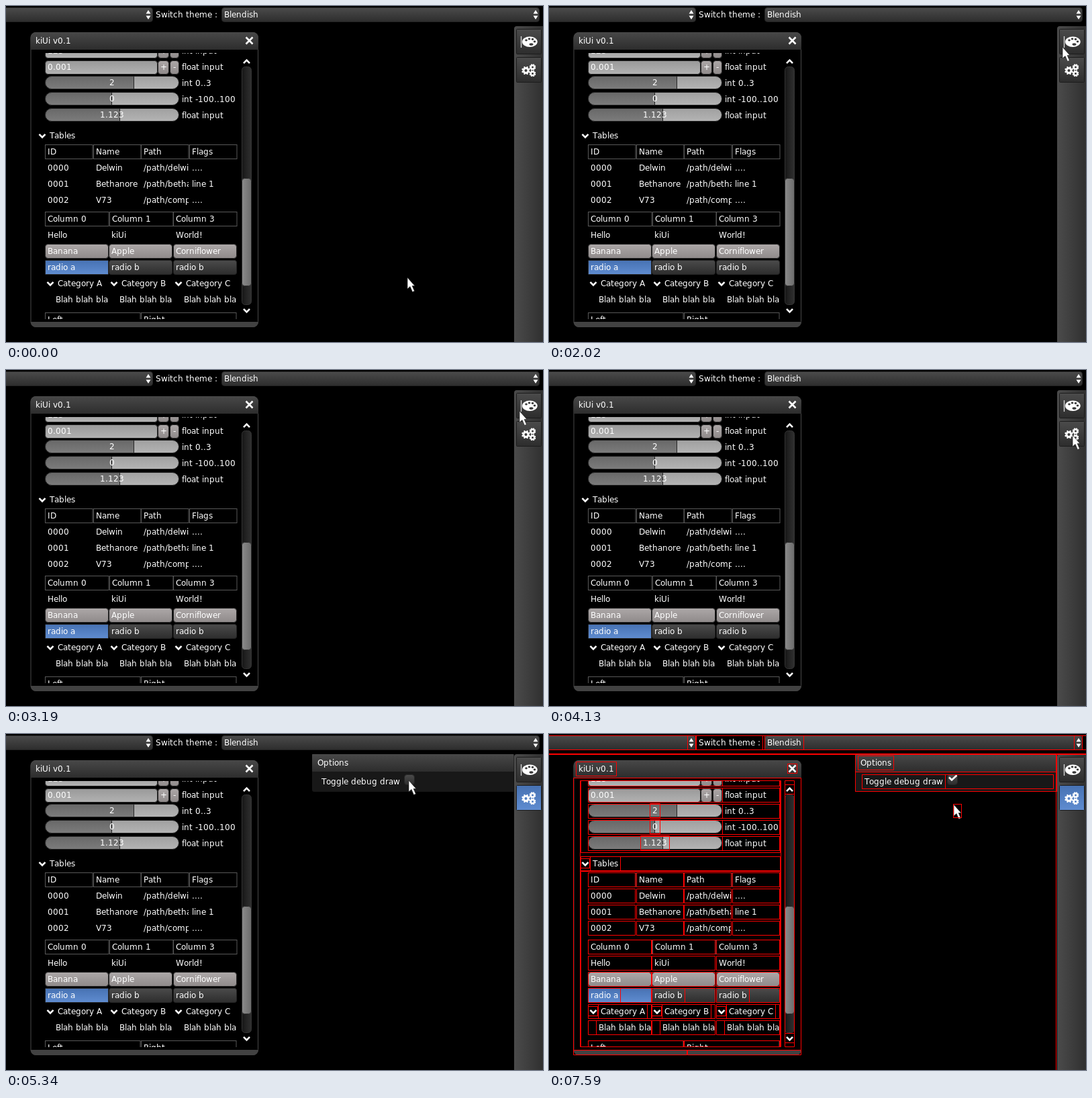
These frames come from a looping animation (800 px wide and 500 px high, 8000 ms). An HTML page:

```html
<!DOCTYPE html>
<html lang="en">
<head>
<meta charset="utf-8">
<title>Widget demo</title>
<style>
html, body { margin: 0; width: 100%; height: 100%; overflow: hidden; background: #000; }
svg { display: block; width: 800px; height: 500px; }
text { font: 12px "DejaVu Sans", sans-serif; fill: #fff; white-space: pre; }
</style>
</head>
<body>
<svg id="stage" viewBox="0 0 800 500" xmlns="http://www.w3.org/2000/svg"></svg>
<script>
const LOOP = 8000;
const stage = document.getElementById('stage');
const pen = document.createElement('canvas').getContext('2d');
pen.font = '12px "DejaVu Sans", sans-serif';
let clips = 0;

const gradient = (id, from, to, across) =>
  `<linearGradient id="${id}" x2="${across ? 1 : 0}" y2="${across ? 0 : 1}">` +
  `<stop stop-color="${from}"/><stop offset="1" stop-color="${to}"/></linearGradient>`;

const rect = (x, y, w, h, fill, r = 0, stroke = 'none') =>
  `<rect x="${x}" y="${y}" width="${w}" height="${h}" rx="${r}" fill="${fill}" stroke="${stroke}"/>`;

const path = (d, fill = '#fff', extra = '') => `<path d="${d}" fill="${fill}" ${extra}/>`;

// The interface font advances by whole pixels
const advance = c => Math.round(pen.measureText(c).width);
const textWidth = s => [...s].reduce((sum, c) => sum + advance(c), 0);

function text(x, y, s) {
  const xs = [];
  for (const c of s) {
    xs.push(x);
    x += advance(c);
  }
  return `<text x="${xs.join(' ')}" y="${y}">${s}</text>`;
}

const centred = (x, y, s) => text(Math.round(x - textWidth(s) / 2), y, s);

function clip(x, y, w, h, inner, r = 0) {
  const id = 'clip' + clips++;
  return `<clipPath id="${id}">${rect(x, y, w, h, '#fff', r)}</clipPath>` +
    `<g clip-path="url(#${id})">${inner}</g>`;
}

const box = (x, y, w, h, style, r = 4) =>
  rect(x + .5, y + .5, w - 1, h - 1, `url(#${style})`, r, '#252525');

const spinner = (x, y) =>
  path(`M${x - 3.5} ${y - 1.5}h7l-3.5 -5.5zM${x - 3.5} ${y + 1.5}h7l-3.5 5.5z`);

const chevron = (x, y, dir = 1) =>
  path(`M${x - 4.5} ${y - 2.2 * dir}l4.5 ${4.6 * dir}l4.5 ${-4.6 * dir}`, 'none',
    'stroke="#fff" stroke-width="2.6"');

// Pill-shaped slider whose dark part ends at part * w
function slider(x, y, w, part, value) {
  const edge = Math.round(x + w * part) - 1;
  let s = box(x, y, w, 20, 'light', 9.5);
  if (part >= 1) s += box(x, y, w, 20, 'filled', 9.5);
  else s += clip(x, y, edge - x, 20, box(x, y, w, 20, 'filled', 9.5)) +
    rect(edge, y + 1, 1, 18, '#252525');
  return s + centred(x + w / 2, y + 14, String(value));
}

const headers = (y, w, names) => names.map((name, i) => {
  const x = Math.round(58 + w * i);
  return rect(x + .5, y + .5, Math.round(w) - 1.5, 21, 'none', 0, '#585858') + text(x + 4, y + 15, name);
}).join('');

function topBar() {
  return box(-20, 2, 239, 22, 'dark') + spinner(212, 13) +
    text(223, 17, 'Switch theme :') +
    box(321, 2, 474, 22, 'dark') + text(325, 17, 'Blendish') + spinner(789, 13);
}

function inputs() {
  let s = '';
  [[57, '123', 'int input'], [81, '0.001', 'float input']].forEach(([y, value, label]) => {
    s += box(58, y, 168, 21, 'field') + box(226, y, 17, 21, 'button') + box(244, y, 14, 21, 'button') +
      text(62, y + 14, value) + centred(235, y + 14, '+') +
      centred(250.5, y + 14, '-') + text(262, y + 14, label);
  });
  [[2 / 3, '2', 'int 0..3'], [.5, '0', 'int -100..100'], [.56, '1.123', 'float input']]
    .forEach(([part, value, label], i) => {
      s += slider(58, 104 + 24 * i, 200, part, value) + text(262, 119 + 24 * i, label);
    });
  return s;
}

const columns = [58, 153, 249];
const radios = ['radio a', 'radio b', 'radio b'];
const categories = ['Category A', 'Category B', 'Category C'];

function tables() {
  let s = chevron(54, 193) + text(65, 197, 'Tables') +
    headers(206, 71.5, ['ID', 'Name', 'Path', 'Flags']);
  [['0000', 'Delwin', '/path/delwin', '....'],
   ['0001', 'Bethanore', '/path/bethanore', 'line 1'],
   ['0002', 'V73', '/path/computer', '....']].forEach((row, j) => {
    row.forEach((cell, i) => {
      const x = Math.round(58 + 71.5 * i);
      s += clip(x, 230 + 24 * j, 71, 24, text(x + 4, 245 + 24 * j, cell));
    });
  });
  s += headers(306, 95.5, ['Column 0', 'Column 1', 'Column 3']);
  const words = ['Hello', 'kiUi', 'World!'];
  const fruits = ['Banana', 'Apple', 'Corniflower'];
  columns.forEach((x, i) => {
    s += text(x + 4, 345, words[i]) +
      box(x, 354, 95, 22, 'button') + text(x + 4, 369, fruits[i]) +
      box(x, 378, 95, 22, i ? 'dark' : 'blue', i ? 3 : 1) + text(x + 4, 393, radios[i]) +
      chevron(x + 8, 413) + text(x + 19, 417, categories[i]) +
      clip(x, 426, 94, 24, text(x + 16, 441, 'Blah blah blah'));
  });
  return s + headers(456, 143, ['Left', 'Right']);
}

function mainWindow() {
  return rect(37, 39.5, 338.5, 438, '#000', 8, '#484848') +
    path('M36.5 65V47a8 8 0 0 1 8-8H368a8 8 0 0 1 8 8V65z', 'url(#title)') +
    path('M36.5 470H376a8 8 0 0 1-8 8H44.5a8 8 0 0 1-8-8z', '#424242') +
    text(44, 56, 'kiUi v0.1') +
    path('M357.5 46.5l10 10m0-10l-10 10', 'none', 'stroke="#fff" stroke-width="2.6"') +
    clip(46, 70, 300, 396, inputs() + tables()) +
    chevron(358.5, 83, -1) + rect(351.5, 90.5, 14, 354, 'url(#track)', 5, '#343434') +
    rect(351.5, 256.5, 14, 160, 'url(#thumb)', 4, '#2c2c2c') + chevron(358.5, 453);
}

const checkbox = (x, y) => box(x, y, 16, 16, 'dark');

const panel = (h, title) =>
  path(`M456 30H756.5V${30 + h}H459a3 3 0 0 1-3-3z`, '#181818') +
  rect(456, 30, 300.5, 26, 'url(#title)', 1) + text(464, 47, title);

function stylePanel() {
  let s = panel(392, 'Style Edit') + box(466, 60, 286, 22, 'field') +
    text(470, 75, 'Button') + spinner(745, 71) + checkbox(515, 88);
  ['Empty', 'Background Colour', 'Gradient Top', 'Gradient Bottom', 'Corner Radius', 'Border Width',
   'Border Colour', 'Text Size', 'Text Colour', 'Padding', 'Image', 'Skin Image']
    .forEach((label, i) => { s += text(470, 103 + 28 * i, label); });
  const group = (y, x, gap, w, values) => values.forEach((v, i) => {
    s += slider(x + gap * i, y, w, v, v);
  });
  group(116, 590, 40.2, 40, [.62, .6, .6, 1]);
  group(256, 557, 48.8, 47, [.146, .146, .146, 1]);
  group(312, 544, 52, 51, [1, 1, 1, 1]);
  [[144, 553, .65, 15], [172, 575, .345, -15], [200, 560, .15, 4], [228, 555, .085, 1],
   [284, 530, .275, 14], [340, 523, .155, 4]]
    .forEach(([y, x, part, value]) => { s += slider(x, y, 751.5 - x, part, value); });
  return s + box(513, 368, 239, 22, 'field') + box(544, 396, 208, 22, 'field');
}

function optionsPanel() {
  return panel(56, 'Options') + text(470, 75, 'Toggle debug draw') + checkbox(593, 60) +
    `<g id="tick">${path('M596 64.5l4 4l7.5-7', 'none', 'stroke="#fff" stroke-width="2.6"')}</g>`;
}

function gear(x, y, r) {
  let teeth = '';
  for (let i = 0; i < 8; i++) {
    const a = (i + .5) * Math.PI / 4, c = Math.cos(a), s = Math.sin(a);
    teeth += `M${x + c * r * .6} ${y + s * r * .6}L${x + c * r} ${y + s * r}`;
  }
  return path(teeth, 'none', 'stroke="#fff" stroke-width="2.2"') +
    `<circle cx="${x}" cy="${y}" r="${r * .56}" fill="none" stroke="#fff" stroke-width="${r * .48}"/>`;
}

function palette() {
  const oval = (x, y, rx, ry, fill) => `<ellipse cx="${x}" cy="${y}" rx="${rx}" ry="${ry}" fill="${fill}"/>`;
  const holes = [[775, 51], [779.5, 49], [784.5, 49.5], [787.5, 53]]
    .map(([x, y]) => oval(x, y, 1.8, 1.4, 'currentColor')).join('');
  return oval(780.3, 53.3, 11.4, 7.8, '#fff') + holes + oval(782.5, 57, 3, 1.8, 'currentColor') +
    path('M767.5 45V62', 'none', 'stroke="#ddd" stroke-width="1.3"');
}

const dockButton = (id, y, icon) =>
  `<g id="${id}">${rect(760.5, y + .5, 37, 37, 'url(#dark)', 1, '#1c1c1c')}${icon}</g>`;

function dock() {
  return path('M757 500V34a4 4 0 0 1 4-4H800V500z', 'url(#dock)') +
    dockButton('styleButton', 34, palette()) +
    dockButton('optionsButton', 76, gear(774.5, 96, 6.4) + gear(784.5, 91, 4.8) + gear(784.5, 100.5, 4.8));
}

// Layout outlines shown once debug drawing is switched on
function outlines() {
  let d = '';
  const frame = (x, y, w, h) => { d += `M${x + .5} ${y + .5}h${w - 1}v${h - 1}h${1 - w}z`; };
  const row = (xs, y, w) => xs.forEach(x => frame(x, y, w, 22));
  const label = (x, baseline, s) => frame(x - 4, baseline - 15, textWidth(s) + 8, 22);
  const icon = (x, y) => frame(x - 8, y - 8, 15, 15);
  const drawn = () => {
    const s = path(d, 'none', 'stroke="#f00"');
    d = '';
    return s;
  };

  frame(-1, 2, 802, 22);
  frame(206, 2, 13, 22);
  label(223, 17, 'Switch theme :');
  label(325, 17, 'Blendish');
  frame(782, 2, 13, 22);
  frame(-1, 29, 802, 2);
  frame(-1, 30, 757, 472);

  frame(36, 65, 340, 406);
  frame(36, 470, 170, 8);
  frame(206, 470, 170, 8);
  label(44, 56, 'kiUi v0.1');
  frame(355, 44, 15, 15);
  frame(46, 69, 300, 397);
  frame(351, 69, 15, 397);
  icon(359, 83);
  icon(359, 453);

  frame(456, 30, 301, 56);
  frame(456, 56, 301, 30);
  label(464, 47, 'Options');
  frame(466, 60, 286, 22);
  label(470, 75, 'Toggle debug draw');
  const outer = drawn();

  frame(47, 60, 298, 117);
  frame(47, 182, 298, 22);
  frame(47, 204, 298, 280);
  icon(54, 193);
  label(65, 197, 'Tables');
  for (let y = 56; y < 160; y += 24) {
    frame(58, y, 286, 22);
    frame(258, y, 86, 22);
  }
  ['2', '0', '1.123'].forEach((s, i) => label(158 - textWidth(s) / 2, 118 + 24 * i, s));
  for (let y = 206; y < 280; y += 24) row([58, 130, 201, 273], y, 71);
  for (let y = 306; y < 440; y += 24) row(columns, y, 95);
  columns.forEach((x, i) => {
    label(x + 4, 393, radios[i]);
    icon(x + 8, 413);
    label(x + 19, 417, categories[i]);
    frame(x + 12, 426, 83, 22);
  });
  row([58, 201], 456, 143);
  return outer + clip(46, 69, 300, 397, drawn());
}

stage.innerHTML = '<defs>' +
  gradient('dark', '#4b4b4b', '#2d2d2d') + gradient('title', '#484848', '#2d2d2d') +
  gradient('button', '#ada8a8', '#8f8a8a') + gradient('field', '#999', '#b2b2b2') +
  gradient('light', '#a0a0a0', '#b4b4b4') + gradient('filled', '#686868', '#7c7c7c') +
  gradient('blue', '#4772b3', '#5f8cd0') + gradient('dock', '#4b4b4b', '#303030', 1) +
  gradient('track', '#171717', '#303030', 1) + gradient('thumb', '#8b8b8b', '#6c6c6c', 1) +
  '</defs>' + rect(0, 0, 800, 500, '#000') + topBar() + mainWindow() + dock() +
  `<g id="stylePanel">${stylePanel()}</g><g id="optionsPanel">${optionsPanel()}</g>` +
  `<g id="debug">${outlines()}</g><g id="cursor">` +
  path('M0 0V17L4 13.5L7.5 21.5L10.5 20.2L7.2 12.5H11z', '#fff', 'stroke="#222" stroke-width=".7"') +
  `<g id="cursorFrame">${rect(-.5, -.5, 12, 20, 'none', 0, '#f00')}</g></g>`;

const el = id => document.getElementById(id);
const show = (id, on) => el(id).setAttribute('display', on ? 'inline' : 'none');

// Pointer positions as [time, x, y]; each is held until the next
const stops = [[0, 598, 404], [120, 599, 405]];
function glide(start, end, n, x, y) {
  const [, x0, y0] = stops[stops.length - 1];
  for (let i = 0; i < n; i++) {
    const p = (i + 1) / n, e = p * p * (3 - 2 * p);
    stops.push([start + (end - start) * i / (n - 1), x0 + (x - x0) * e, y0 + (y - y0) * e]);
  }
}
glide(960, 1670, 7, 765, 61);
glide(3320, 3440, 2, 773, 61);
glide(3680, 3785, 2, 776, 82);
stops.push([3890, 773, 61], [4130, 780, 97]);
glide(5010, 5340, 4, 600, 69);
glide(7470, 7590, 2, 603, 105);

function press(id, on) {
  const group = el(id);
  group.firstElementChild.setAttribute('fill', on ? 'url(#blue)' : 'url(#dark)');
  group.setAttribute('color', on ? '#4f7bbf' : '#383838');
}

function draw(t) {
  const styling = t >= 2130 && t < 3190, options = t >= 4380, debug = t >= 6300;
  show('stylePanel', styling);
  show('optionsPanel', options);
  press('styleButton', styling);
  press('optionsButton', options);
  ['tick', 'debug', 'cursorFrame'].forEach(id => show(id, debug));
  const [, x, y] = stops.filter(s => s[0] <= t).pop();
  el('cursor').setAttribute('transform', `translate(${Math.round(x)} ${Math.round(y)})`);
}

const began = performance.now();
function tick() {
  draw((performance.now() - began) % LOOP);
  requestAnimationFrame(tick);
}
draw(0);
requestAnimationFrame(tick);
</script>
</body>
</html>
```
